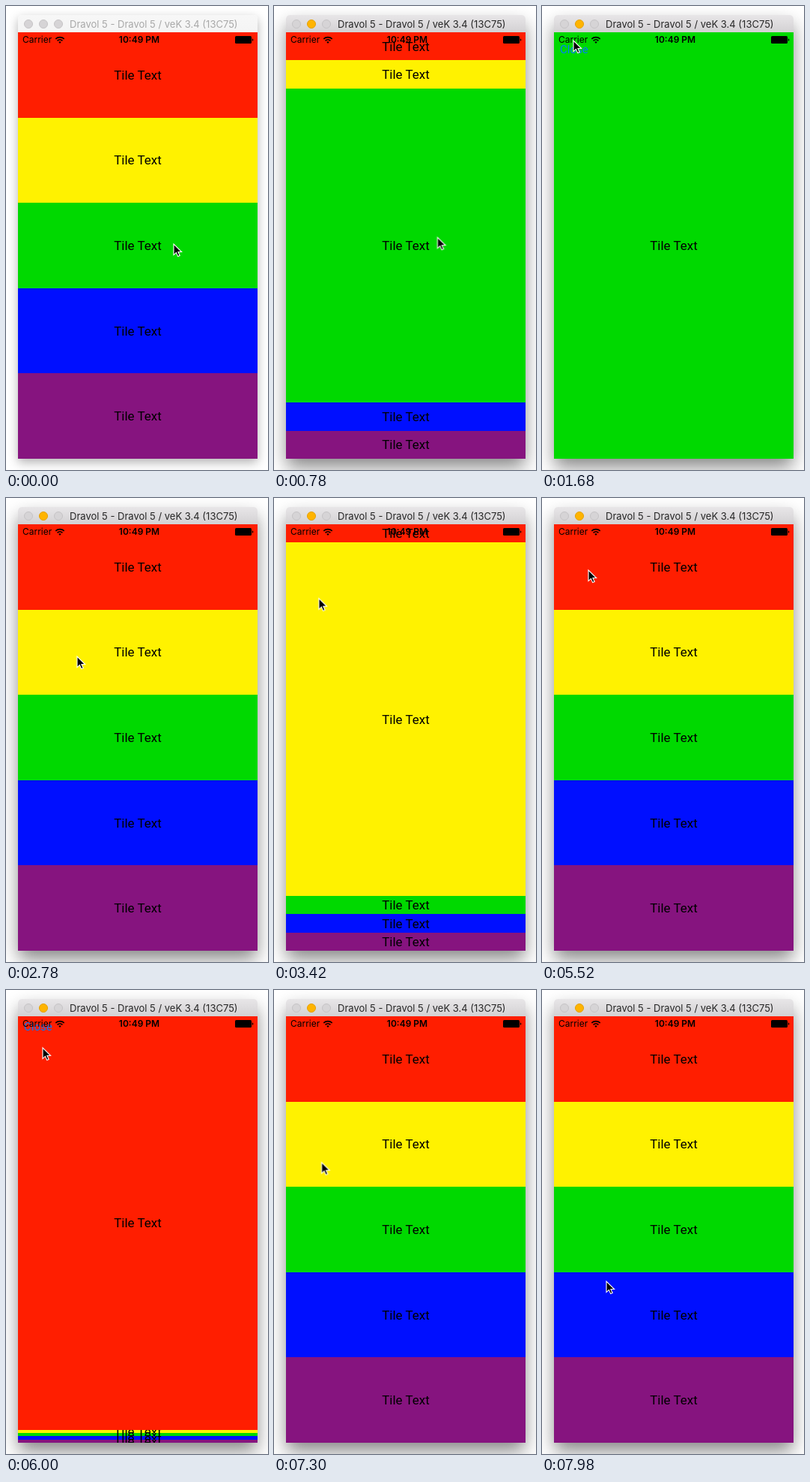
Write an HTML page that moves like this. It is 350 px wide and 618 px high and loops after 8000 ms.

```html
<!DOCTYPE html>
<html lang="en">
<head>
<meta charset="utf-8">
<title>Expanding tiles</title>
<style>
  html, body { margin: 0; width: 100%; height: 100%; overflow: hidden; background: #fff; }
  #stage { position: relative; width: 350px; height: 618px; overflow: hidden; color: #000; }
  #window {
    position: absolute; left: 16px; top: 12px; width: 320px; height: 591px;
    border-radius: 5px 5px 0 0;
  }
  #bar {
    position: absolute; inset: 0 0 auto; height: 23px; border-radius: 5px 5px 0 0;
    font: 13px/24px Inter, sans-serif; white-space: nowrap;
  }
  #bar span { position: absolute; left: 69px; top: 0; }
  #bar i {
    position: absolute; top: 6px; width: 12px; height: 12px; box-sizing: border-box;
    border-radius: 50%; border: 1px solid #c6c4c6; background: #d6d4d6;
  }
  #screen { position: absolute; left: 0; top: 23px; width: 320px; height: 568px; overflow: hidden; }
  .tile {
    position: relative; display: flex; align-items: center; justify-content: center;
    height: 113.6px; overflow: hidden; font: 17px/20px Roboto, sans-serif; white-space: nowrap;
  }
  .tile span { flex: none; }
  .close { position: absolute; left: 8px; top: 13px; font-size: 15px; color: #007aff; }
  #status { position: absolute; inset: 0 0 auto; height: 20px; font: 12px/20px Inter, sans-serif; }
  #status span { position: absolute; left: 6px; }
  #status b { position: absolute; left: 102px; width: 120px; text-align: center; font-weight: 600; }
  #status svg { position: absolute; left: 0; top: 0; }
  #cursor { position: absolute; left: -2px; top: -2px; }
</style>
</head>
<body>
<div id="stage">
  <div id="window">
    <div id="bar">
      <i style="left:8px"></i><i id="minimize" style="left:28px"></i><i style="left:48px"></i>
      <span>Dravol 5 - Dravol 5 / veK 3.4 (13C75)</span>
    </div>
    <div id="screen">
      <div id="tiles"></div>
      <div id="status">
        <span>Carrier</span><b>10:49 PM</b>
        <svg width="320" height="20">
          <path d="M50.3 8.8a8.4 8.4 0 0 1 11.4 0M52.6 11.3a5 5 0 0 1 6.8 0"
                fill="none" stroke="#000" stroke-width="1.7"/>
          <path d="M54.3 13a2.6 2.6 0 0 1 3.4 0L56 14.9zM312.8 8.2q1.6 .4 1.6 1.8t-1.6 1.8z"/>
          <rect x="290" y="5" width="22" height="10" rx="1.5"/>
        </svg>
      </div>
    </div>
  </div>
  <svg id="cursor" width="16" height="22">
    <path transform="translate(2 2)" d="M0 0v14.6l3.4-3.2 2.3 5.2 2.5-1.1-2.3-5h4.7z"
          fill="#000" stroke="#fff" stroke-width="1.1"/>
  </svg>
</div>
<script>
  const LOOP = 8000, MOVE = 500, FOCUS = 420;
  const REST = 113.6, FULL = 568, SLIDE = -227;
  const COLORS = ['#ff1e00', '#fff200', '#00d900', '#000fff', '#86147f'];

  // tile index, time it opens, time it closes
  const VISITS = [[2, 480, 1760], [1, 3081, 4238], [0, 5570, 6640]];

  // time, x, y of the pointer tip
  const POINTER = [
    [0, 224, 317], [760, 224, 317], [1120, 128, 165], [1480, 42, 46], [2020, 42, 46],
    [2360, 66, 132], [2700, 95, 211], [3160, 95, 211], [3420, 60, 134], [3700, 42, 46],
    [4360, 42, 46], [4520, 42, 67], [4850, 62, 96], [5720, 62, 96], [6000, 49, 77],
    [6200, 42, 46], [6860, 42, 46], [7350, 66, 250], [7800, 86, 388], [8000, 86, 388]
  ];

  const $ = id => document.getElementById(id);

  // steps: [time, style, easing]
  function play(el, steps) {
    const frames = steps.map(([t, style, easing = 'linear']) => ({ offset: t / LOOP, easing, ...style }));
    el.animate(frames, { duration: LOOP, iterations: Infinity });
  }

  // Tracks a property that rests, then eases to each visit's value and back.
  function visit(el, rest, opened, visits) {
    const steps = [[0, rest]];
    for (const [i, open, close] of visits) {
      const value = opened(i);
      steps.push([open, rest, 'ease-in-out'], [open + MOVE, value],
                 [close, value, 'ease-in-out'], [close + MOVE, rest]);
    }
    play(el, [...steps, [LOOP, rest]]);
  }

  function focusChange(el, inactive, active) {
    play(el, [[0, inactive, 'step-end'], [FOCUS, active, 'step-end'], [LOOP, active]]);
  }

  COLORS.forEach((color, n) => {
    const tile = document.createElement('div');
    tile.className = 'tile';
    tile.style.background = color;
    tile.innerHTML = '<span>Tile Text</span><span class="close">Close</span>';
    $('tiles').append(tile);
    visit(tile, { height: REST + 'px' }, i => ({ height: (i === n ? FULL : 0) + 'px' }), VISITS);
    visit(tile.querySelector('.close'), { transform: `translateY(${SLIDE}px)` },
          () => ({ transform: 'translateY(0px)' }), VISITS.filter(([i]) => i === n));
  });

  play($('cursor'), POINTER.map(([t, x, y]) => [t, { transform: `translate(${x}px, ${y}px)` }]));

  focusChange($('window'),
    { boxShadow: '0 5px 14px rgba(0,0,0,.3)' },
    { boxShadow: '0 12px 24px -1px rgba(0,0,0,.48)' });
  focusChange($('bar'),
    { background: 'linear-gradient(#f7f7f7, #f4f4f4)', color: '#a8a8a8' },
    { background: 'linear-gradient(#e8e6e8, #d3d1d3)', color: '#262626' });
  focusChange($('minimize'),
    { background: '#d6d4d6', borderColor: '#c6c4c6' },
    { background: '#ffb400', borderColor: '#e5a000' });
</script>
</body>
</html>
```
